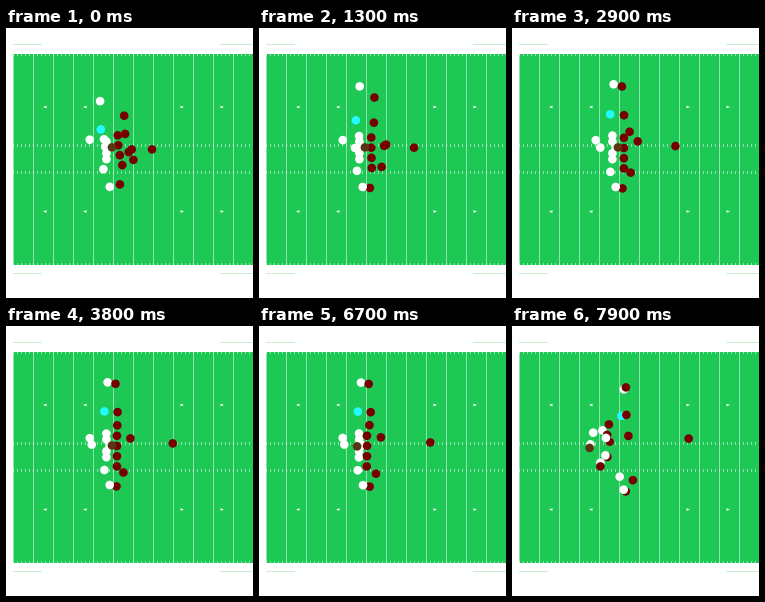
A matplotlib script for the animation above (8 s loop, 247x270 px).

```python
import numpy as np
import matplotlib.pyplot as plt
from matplotlib.animation import FuncAnimation
from matplotlib.patches import Circle, Polygon, Rectangle

W, H, DPI = 247, 270, 100
FRAMES, STEP = 80, 100
TURF, WHITE, CYAN, SIDELINE = "#1dc855", "#ffffff", "#22fbff", "#c4efd1"
MAROON, BROWN = "#760000", "#5b3413"
LEFT, TOP, BOTTOM, MIDDLE = 7, 26, 237, 127.5
RADIUS = 4.3
PIXEL = 0.4               # dots sit near pixel centres
SNAP, END = 6.4, 7.9      # seconds

clock = np.arange(FRAMES)[:, None] * STEP / 1000


def span(t0, t1):
    return np.clip((clock - t0) / (t1 - t0), 0, 1)


def slow_down(u):
    return u * (2 - u)


def smooth(u):
    return u * u * (3 - 2 * u)


def lerp(a, b, s):
    return (1 - s) * np.asarray(a, float) + s * np.asarray(b, float)


def route(start, ready, end, settle=2, bend=None, ease=slow_down, creep=0):
    """Curve into the stance, creep forward, then accelerate after the snap."""
    if bend is None:
        bend = lerp(start, ready, 0.5)
    s = ease(span(0, settle))
    stance = lerp(lerp(start, bend, s), lerp(bend, ready, s), s)
    stance = stance - smooth(span(2, 6.5)) * [creep, 0]
    return lerp(stance, end, span(SNAP, END) ** 2)


fig = plt.figure(figsize=(W / DPI, H / DPI), dpi=DPI, facecolor="white")
ax = fig.add_axes([0, 0, 1, 1])
ax.set(xlim=(0, W), ylim=(H, 0))
ax.axis("off")
dots = []


def box(x, y, w, h, color, alpha=1):
    ax.add_patch(Rectangle((x, y), w, h, color=color, alpha=alpha, lw=0))


def draw_field():
    box(LEFT, TOP, W - LEFT, BOTTOM - TOP, TURF)
    for y in (16, 245):
        box(LEFT, y, 29, 1, SIDELINE)
        box(214, y, W - 214, 1, SIDELINE)
    for x in range(LEFT, W, 20):
        box(x, TOP, 1, BOTTOM - TOP, WHITE, 0.5)
    for y, tall in ((TOP, 2), (116, 3), (143, 3), (BOTTOM - 2, 2)):
        for x in range(LEFT, W, 4):
            box(x, y, 1, tall, WHITE, 0.5)
    for y in (79, 183.5):
        for reach in (-90.5, -50.5, 50.5, 90.5):
            tip = MIDDLE + reach
            back = tip - 3.5 * np.sign(reach)
            ax.add_patch(Polygon([(tip, y), (back, y - 1.3), (back, y + 1.3)],
                                 color=WHITE, lw=0))


def dot(color, z, path):
    patch = ax.add_patch(Circle(path[0], RADIUS, color=color, lw=0, zorder=z))
    dots.append((patch, path + PIXEL))


def offence():
    pocket = [(90, 104), (93.5, 111.5), (97, 115), (93, 129), (88, 136.3)]
    for k, end in zip(range(-2, 3), pocket):
        x, y = (100 if k else 103.3), 119 + 5.9 * k
        late = max(0, -k - 1)    # the left tackle sets up late
        dot(WHITE, 5 if k % 2 else 3,
            route((x - 2.4 * late, y + 3.6 * late), (x, y), end))
    dot(WHITE, 3, route((93.7, 72.8), (101.2, 55.9), (111.5, 63)))
    dot(CYAN, 3, route((94.4, 101), (98, 85), (109, 89.5), 3.8))
    dot(WHITE, 3, route((83.3, 111.3), (83.4, 111.8), (80.8, 106.3)))
    dot(WHITE, 5, route((97, 140.8), (98, 143.6), (107.3, 150.3), 3.8))
    dot(WHITE, 5, route((103.4, 158.4), (103.3, 158.6), (111.3, 163.3)))
    passer = route((98.8, 118.5), (85.2, 118.2), (78, 118), 4,
                   bend=(92.5, 121.5), ease=smooth)
    dot(WHITE, 3, passer)
    dot(BROWN, 6, lerp((105.5, 119), passer + [-0.8, 3.5], span(6.5, 7.05)))


def defence():
    rush = [(94.7, 108.5), (97.3, 115.3), (95, 130.5), (88, 140)]
    for k, end in enumerate(rush):
        dot(MAROON, 4, route((111.4 + 0.5 * k * k, 107 + 9.9 * k),
                             (111.9, 109.4 + 10.2 * k), end, creep=3.8))
    # Linebackers
    dot(MAROON, 4, route((122.3, 123.7), (110.6, 98.8), (96.5, 98), 4,
                         bend=(131, 111), ease=smooth))
    dot(MAROON, 4, route((125.3, 121), (121.7, 111), (116, 109.5), 6.5,
                         bend=(129.5, 113.5)))
    dot(MAROON, 4, route((127, 131.5), (116.4, 147), (120.5, 153.8), 5))
    # Backs
    dot(MAROON, 4, route((117.8, 87.3), (109.1, 57.4), (113.5, 61), 3.4,
                         bend=(119, 73)))
    dot(MAROON, 4, route((118.7, 105.5), (111.2, 85.7), (114, 88.5), 3.8))
    dot(MAROON, 4, route((113.5, 156), (110.1, 160), (113.4, 165)))
    dot(MAROON, 4, route((145.6, 121), (170.7, 116.2), (176.3, 112.2), 6.5))


draw_field()
offence()
defence()


def update(i):
    for patch, path in dots:
        patch.center = path[i]
    return [patch for patch, _ in dots]


anim = FuncAnimation(fig, update, frames=FRAMES, interval=STEP,
                     repeat=True, repeat_delay=0)
plt.show()
```
